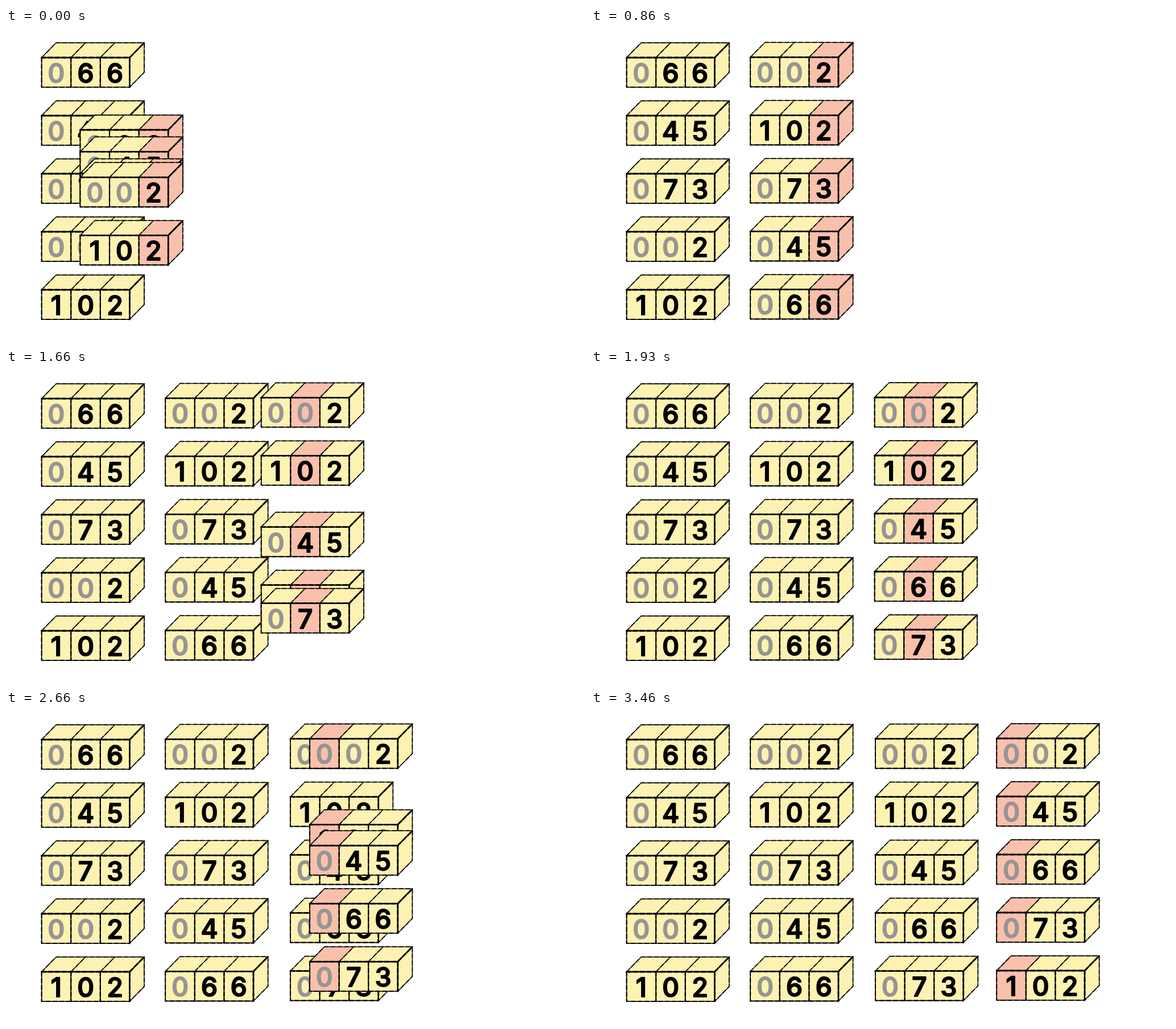
These frames come from a looping animation (1018x550 px, 3590 ms). An HTML page with a canvas:

```html
<!DOCTYPE html>
<html lang="en">
<head>
<meta charset="utf-8">
<title>Radix sort</title>
<style>
  html, body { margin: 0; width: 100%; height: 100%; overflow: hidden; background: #fff; }
  canvas { display: block; }
</style>
</head>
<body>
<canvas id="stage" width="1018" height="550"></canvas>
<script>
const ctx = document.getElementById('stage').getContext('2d');

const LOOP = 3590;
const YELLOW = '#fdf2b2', PINK = '#f9c0ac', GREY = '#969593', INK = '#000';
const CELL = 51.6, HEIGHT = 52, DEPTH_X = 25.6, DEPTH_Y = -26;
const WIDTH = 3 * CELL;
const ROW_TOP = 52, ROW_GAP = 102;

// The picture advances in uneven steps that repeat every 600 ms.
const STEP_OFFSETS = [0, 70, 200, 320, 400, 470];
const PASS_STEPS = 9.36;

const COLUMNS = [{ x: 62.6, dy: 0 }, { x: 280.2, dy: -0.6 }, { x: 500, dy: -1.4 }];
const PASSES = [
  { start: -3.53, land: { x: 280.2, dy: -0.6 } },
  { start: 10.61, land: { x: 498.6, dy: -2 }, reverseStack: true },
  { start: 24.55, land: { x: 713.2, dy: -2 } },
];

const digitAt = (value, place) => Math.floor(value / 10 ** place) % 10;
const rowY = (row, column) => ROW_TOP + row * ROW_GAP + column.dy;
const ease = p => (1 - Math.cos(Math.PI * p)) / 2;
const mix = (a, b, p) => a + (b - a) * p;

// orders[n] is the list after n passes; Array.sort is stable.
const orders = [[66, 45, 73, 2, 102]];
PASSES.forEach((_, place) => orders.push(
  [...orders[place]].sort((a, b) => digitAt(a, place) - digitAt(b, place))));

function fillShape(color, ...points) {
  ctx.fillStyle = color;
  ctx.beginPath();
  points.forEach(([x, y]) => ctx.lineTo(x, y));
  ctx.fill();
}

// A solid line with a slightly wider broken one gives the inked look.
function inkLine(width, ...points) {
  ctx.strokeStyle = INK;
  ctx.beginPath();
  points.forEach(([x, y]) => ctx.lineTo(x, y));
  ctx.lineWidth = width;
  ctx.stroke();
  ctx.lineWidth = width + 0.4;
  ctx.setLineDash([7, 5]);
  ctx.stroke();
  ctx.setLineDash([]);
}

function drawDigit(char, x, color) {
  ctx.fillStyle = ctx.strokeStyle = color;
  ctx.lineWidth = 2;
  ctx.fillText(char, x, 43.9);
  ctx.strokeText(char, x, 43.9);
}

function drawBlock(value, x, y, litPlace = -1) {
  const litCell = 2 - litPlace;
  const back = cx => [cx + DEPTH_X, DEPTH_Y];
  ctx.save();
  ctx.translate(x, y);

  for (let i = 0; i < 3; i++) {
    const left = i * CELL, right = left + CELL;
    fillShape(i === litCell ? PINK : YELLOW,
      [left, HEIGHT], [left, 0], back(left), back(right), [right, 0], [right, HEIGHT]);
  }
  fillShape(litCell === 2 ? PINK : YELLOW,
    [WIDTH, 0], back(WIDTH), [WIDTH + DEPTH_X, HEIGHT + DEPTH_Y], [WIDTH, HEIGHT]);

  inkLine(1.3, [0, 0], back(0), back(WIDTH), [WIDTH + DEPTH_X, HEIGHT + DEPTH_Y], [WIDTH, HEIGHT]);
  inkLine(1.6, [0, 0], [0, HEIGHT], [WIDTH, HEIGHT]);
  for (const cx of [CELL, 2 * CELL]) {
    inkLine(1.3, [cx, 0], back(cx));
    inkLine(1.9, [cx, 0], [cx, HEIGHT]);
  }
  inkLine(2.4, [0, 0], [WIDTH, 0], back(WIDTH));
  inkLine(2.4, [WIDTH, 0], [WIDTH, HEIGHT]);

  const text = String(value).padStart(3, '0');
  const zeros = 3 - String(value).length;
  [...text].forEach((char, i) =>
    drawDigit(char, (i + 0.5) * CELL, i < zeros ? GREY : INK));
  ctx.restore();
}

function drawColumn(index) {
  const column = COLUMNS[index];
  orders[index].forEach((value, row) => drawBlock(value, column.x, rowY(row, column)));
}

function drawPass(place, step) {
  const { start, land, reverseStack } = PASSES[place];
  const from = COLUMNS[place];
  const p = ease(Math.min(1, (step - start) / PASS_STEPS));
  const stack = reverseStack ? [...orders[place]].reverse() : orders[place];
  for (const value of stack) {
    const y0 = rowY(orders[place].indexOf(value), from);
    const y1 = rowY(orders[place + 1].indexOf(value), land);
    drawBlock(value, mix(from.x, land.x, p), mix(y0, y1, p), place);
  }
}

function stepAt(ms) {
  const t = ms - 60;
  if (t < 0) return 0;
  return 6 * Math.floor(t / 600) + STEP_OFFSETS.filter(offset => offset <= t % 600).length;
}

function draw(now) {
  const step = stepAt(now % LOOP);
  const place = PASSES.filter(pass => pass.start <= step).length - 1;
  ctx.fillStyle = '#fff';
  ctx.fillRect(0, 0, 1018, 550);
  ctx.font = '500 46px Inter, "Open Sans", sans-serif';
  ctx.textAlign = 'center';
  ctx.lineJoin = ctx.lineCap = 'round';
  for (let i = 0; i <= place; i++) drawColumn(i);
  drawPass(place, step);
}

function tick() {
  draw(performance.now());
  requestAnimationFrame(tick);
}
tick();
</script>
</body>
</html>
```
